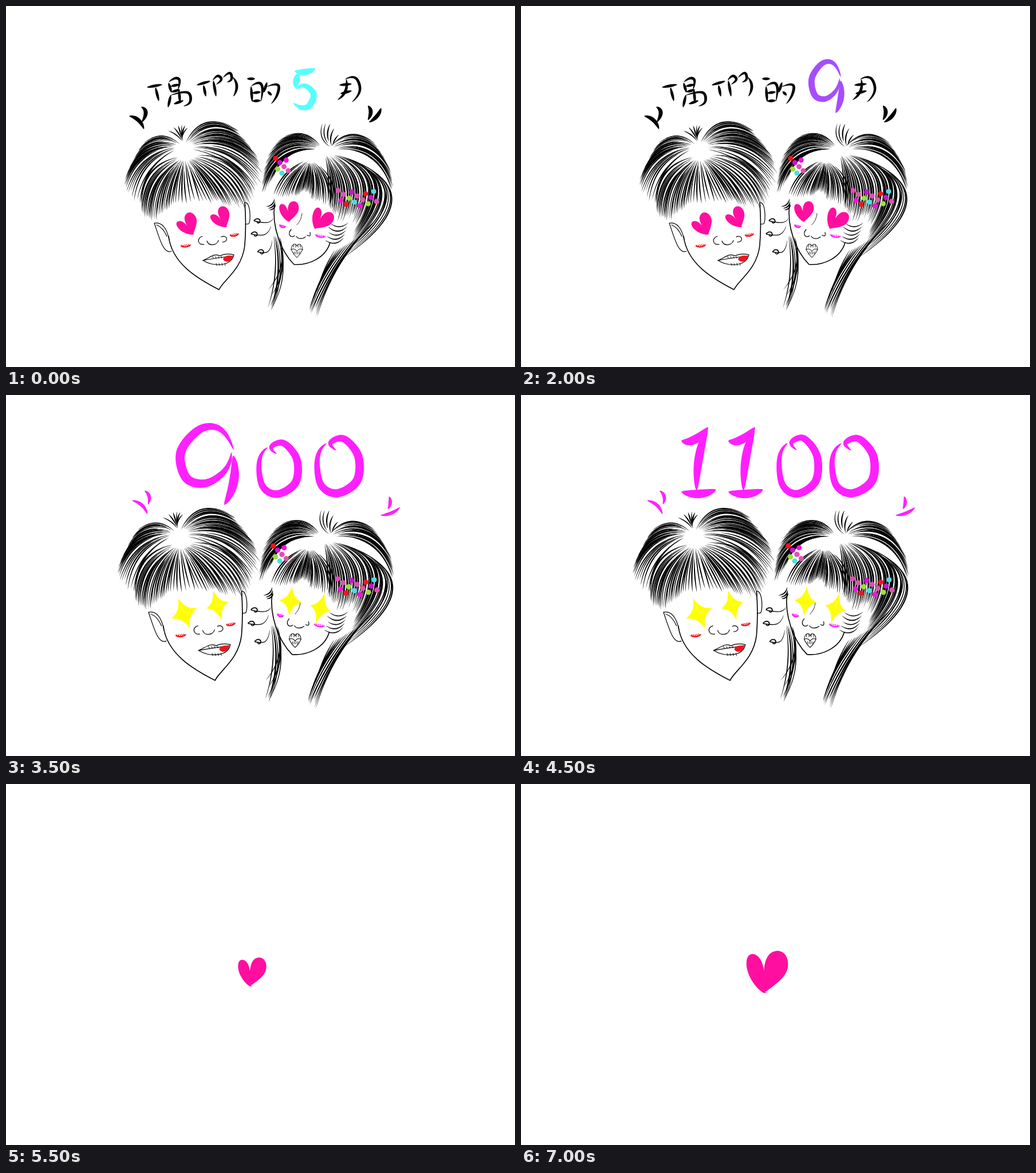
Write an HTML page with a canvas that moves like this. It is 889x630 px and loops after 7500 ms.

```html
<!DOCTYPE html>
<html lang="zh-Hant">
<head>
<meta charset="utf-8">
<title>偶們的</title>
<style>
html, body { margin: 0; width: 100%; height: 100%; overflow: hidden; background: #fff; }
canvas { display: block; }
</style>
</head>
<body>
<canvas id="stage" width="889" height="630" role="img" aria-label="偶們的月"></canvas>
<script>
const g = document.getElementById('stage').getContext('2d');
const INK = '#000', PINK = '#ff0fa0', MAGENTA = '#ff20ff', RED = '#f0141e', YELLOW = '#ffff00';

let seed = 1;
const rand = () => (seed = seed * 16807 % 2147483647) / 2147483647;
const mix = (a, b, t) => a + (b - a) * t;
const points = s => s.split(' ').map(p => p.split(',').map(Number));

// Catmull-Rom through key points, ends continued as parabolas
function spline(pts, t) {
  const n = pts.length;
  if (n === 1) return pts[0];
  const at = (i, k) => {
    if (i >= 0 && i < n) return pts[i][k];
    const a = i < 0 ? 0 : n - 1, d = i < 0 ? 1 : -1;
    if (n === 2) return 2 * pts[a][k] - pts[a + d][k];
    return 3 * pts[a][k] - 3 * pts[a + d][k] + pts[a + 2 * d][k];
  };
  const i = Math.min(Math.floor(t * (n - 1)), n - 2), u = t * (n - 1) - i;
  return [0, 1].map(k => {
    const [a, b, c, d] = [at(i - 1, k), at(i, k), at(i + 1, k), at(i + 2, k)];
    return b + u / 2 * (c - a + u * (2 * a - 5 * b + 4 * c - d + u * (3 * (b - c) + d - a)));
  });
}

// Stroke that swells to the given width and ends in points
function brush(pts, width, power = 0.6) {
  const steps = 8 * pts.length, left = [], right = [];
  for (let i = 0; i <= steps; i++) {
    const t = i / steps;
    const [x, y] = spline(pts, t);
    const [ax, ay] = spline(pts, Math.max(0, t - 0.01));
    const [bx, by] = spline(pts, Math.min(1, t + 0.01));
    const r = (width * Math.sin(Math.PI * t) ** power / 2 || 0) / (Math.hypot(bx - ax, by - ay) || 1);
    left.push([x + (ay - by) * r, y + (bx - ax) * r]);
    right.unshift([x - (ay - by) * r, y - (bx - ax) * r]);
  }
  g.beginPath();
  left.concat(right).forEach(p => g.lineTo(...p));
  g.fill();
}

function write(text, width, color) {
  g.fillStyle = color;
  text.split('|').forEach(s => brush(points(s), width));
}

// Hair: strands from a root curve to a tip curve, bent by a share of their length
function hair(roots, tips, n, bendA, bendB, width = 1.9) {
  roots = points(roots);
  tips = points(tips);
  g.fillStyle = INK;
  for (let i = 0; i < n; i++) {
    const t = i / (n - 1);
    const [x0, y0] = spline(roots, t), [x1, y1] = spline(tips, t);
    const bend = mix(bendA, bendB, t) + (rand() - 0.5) * 0.03;
    const dx = x1 - x0, dy = y1 - y0;
    const along = s => {
      const b = 4 * s * (1 - s) * bend;
      return [x0 + dx * s - dy * b, y0 + dy * s + dx * b];
    };
    const start = roots.length > 1 ? 0 : 0.07 + i % 3 * 0.1 + rand() * 0.05;
    const end = 0.95 + rand() * 0.09;
    brush([along(start), along((start + end) / 2), along(end)], width * (0.75 + rand() * 0.5), 0.7);
  }
}

function line(d, width = 1.2, color = INK) {
  g.strokeStyle = color;
  g.lineWidth = width;
  g.lineCap = 'round';
  g.stroke(new Path2D(d));
}

function fill(d, color) {
  g.fillStyle = color;
  g.fill(new Path2D(d));
}

function placed(x, y, turn, paint) {
  g.save();
  g.translate(x, y);
  g.rotate(turn);
  paint();
  g.restore();
}

function lashes(x, y, w, turn, color) {
  placed(x, y, turn, () => {
    line(`M${-w} -1 Q0 4 ${w} -1`, 2.2, color);
    for (let i = -2; i <= 2; i++) line(`M${i * w / 2.6} 1 l-1.5 -3.5`, 1.3, color);
  });
}

// Lock that starts as a small spiral and runs out to a point
function curl(x, y, endX, endY) {
  const pts = [];
  for (let i = 0; i < 8; i++) {
    const a = i * 0.9 + 3, r = 1.5 + i * 0.6;
    pts.push([x + r * Math.cos(-a), y + r * Math.sin(-a)]);
  }
  g.fillStyle = INK;
  brush([...pts, [mix(x, endX, 0.6), mix(y, endY, 0.2) + 3], [endX, endY]], 1.8, 0.4);
}

const BEADS = ['#e04fb4', '#f014dc', '#d75aa8', RED, '#9be03c', '#c814d2', '#50dce6'];

function beads(x, y, w, h, n, shift) {
  for (let i = 0; i < n; i++) {
    g.fillStyle = BEADS[(i + shift) % BEADS.length];
    g.beginPath();
    g.arc(x + w * i / (n - 1), y + h * (i * 0.62 % 1), 4.5, 0, 7);
    g.fill();
  }
}

function boy() {
  line('M289 428 C275 434 268 405 259 379 C272 376 281 388 285 408 M263 382 Q274 386 281 402');
  line('M284 402 C290 450 335 476 372 495 C380 478 412 460 417 418 Q420 380 417 344', 1.6);
  line('M417 343 C427 342 428 374 424 380 L418 381');
  line('M343 402 C333 404 334 418 346 416 M351 410 C354 420 369 418 371 409 M376 403 C386 398 390 412 378 412');
  line('M344 444 C358 438 364 431 374 436 Q384 431 398 434 C394 454 364 456 344 444 Q366 440 396 436');
  for (let i = 0; i < 4; i++) line(`M${367 + i * 5} 449 l1 4 M${361 + i * 5} 437 l1 3`, 0.9);
  fill('M379 442 C382 434 393 435 396 437 C395 446 384 450 379 442Z', RED);
  lashes(314, 419, 8, -0.1, RED);
  lashes(399, 400, 7, -0.2, RED);

  hair('308,246', '238,241 216,282 208,314 234,342', 25, 0.25, 0.15);
  hair('310,248', '402,214 425,245 446,282 432,326', 34, -0.28, -0.14);
  hair('313,262', '236,348 249,372 272,362 297,344 357,342 388,346 417,350 432,326', 62, 0.22, -0.2);
  hair('309,238', '284,218 304,207 318,212', 6, 0.1, -0.15);
}

function girl() {
  line('M469 346 C464 385 480 428 503 451 C528 453 558 440 566 413', 1.6);
  line('M517 362 Q516 374 508 382', 0.8);
  line('M498 390 C491 398 497 406 504 401 M507 402 C510 407 518 407 523 403 M526 400 Q533 404 531 395');
  line('M498 425 C499 413 507 414 508 419 C510 414 517 414 518 425 Q514 434 508 439 Q502 434 498 425 Q504 422 508 428 Q512 422 518 425', 1);
  for (let i = 0; i < 4; i++) line(`M${502 + i * 4} 416 l0 5 M${503 + i * 3} 433 l1 -4`, 0.9);
  lashes(483, 385, 5, 0.2, MAGENTA);
  lashes(549, 402, 8, 0.15, MAGENTA);

  curl(440, 376, 467, 370);
  curl(435, 399, 463, 383);
  curl(446, 430, 465, 408);
  hair('469,336 471,346', '455,350 459,356', 3, -0.2, -0.2);
  hair('598,378 590,404', '565,378 558,409', 5, -0.22, -0.22);

  hair('553,251', '482,230 460,258 451,290 449,320 466,302', 32, 0.22, 0.22);
  hair('531,268', '468,328 500,332 522,324 540,339 575,350', 38, 0.12, -0.16);
  hair('556,254', '562,345 582,372 602,370 612,390 604,410 588,440', 50, -0.05, -0.54);
  hair('562,252', '646,241 671,288 674,325', 19, -0.25, -0.22);
  hair('570,248', '553,204 566,206 582,224', 5, -0.2, -0.1);
  hair('655,365 610,405 575,425', '544,540 536,535 529,533 543,500', 13, 0.06, 0.04);
  hair('467,400 478,402', '457,528 464,530 459,494', 8, -0.06, -0.14);

  beads(471, 266, 22, 30, 7, 3);
  beads(580, 322, 67, 28, 15, 0);
}

function couple() {
  seed = 77;
  boy();
  girl();
}

function heart(x, y, size, turn = 0) {
  placed(x, y, turn, () => {
    g.scale(size, size);
    fill('M-6 37 C-25 25 -41 -4 -35 -24 C-31 -36 -14 -34 -8 -13 Q-5 -4 -6 7 C-6 -18 0 -36 18 -37 C37 -36 40 -12 33 1 C26 15 7 27 -6 37 L-1 35 L-2 37Z', PINK);
  });
}

function star(x, y, rx, ry, turn) {
  placed(x, y, turn, () => {
    const d = `M0 ${-ry} Q${rx * 0.25} ${-ry * 0.25} ${rx} 0 Q${rx * 0.25} ${ry * 0.25} 0 ${ry} Q${-rx * 0.25} ${ry * 0.25} ${-rx} 0 Q${-rx * 0.25} ${-ry * 0.25} 0 ${-ry}Z`;
    fill(d, YELLOW);
    line(d, 3, YELLOW);
    line(`M0 ${-ry * 0.6} L0 0 L${rx * 0.6} 0`, 0.6, '#ffffa0');
  });
}

// Key points of each digit in a box of 100 by 100
const DIGITS = {
  0: '27,13 8,38 15,80 48,94 88,74 91,34 62,6 35,12 47,25',
  1: '0,19 36,18 76,0|74,2 50,42 43,90|0,91 50,94 98,88',
  2: '8,22 45,4 88,24 55,65 15,92|8,94 50,94 100,84',
  5: '10,9 55,11 98,3|28,14 17,32 16,50|16,54 54,44 91,64 72,92 40,96 4,85',
  6: '85,4 30,30 12,70 45,94 85,80 75,52 40,52 18,72',
  7: '4,10 50,12 96,4|94,6 62,45 50,98',
  8: '70,10 30,8 25,38 75,60 70,90 25,90 25,62 70,38 70,10',
  9: '96,32 72,5 38,6 7,34 16,66 48,73 80,58 92,34|95,38 96,70 80,100'
};

function digit(ch, x, y, w, h, thick, color) {
  g.fillStyle = color;
  for (const s of DIGITS[ch].split('|'))
    brush(points(s).map(([a, b]) => [x + a * w / 100, y + b * h / 100]), thick);
}

const LETTERS = [
  '246,142 273,137|261,142 267,166|284,134 289,151|284,133 296,126 303,130 300,147|288,140 303,137|289,150 304,146|288,155 283,177|287,156 317,151 322,166 310,175|302,146 304,169|293,171 310,165',
  '333,138 357,131|345,138 349,158|362,130 367,158|361,130 370,122 376,128 367,137|379,125 391,117 394,127 386,133|396,124 403,140 397,158',
  '421,127 435,127|428,140 430,167|428,140 446,137 445,167|430,152 445,150|430,166 445,165|456,133 450,151|455,141 475,138 474,154 463,171|457,149 464,156',
  '594,127 593,148 579,164|592,128 611,126 618,147 604,168|582,138 604,136|584,153 604,148'
];

const MONTH_COLORS = ['#55ffff', '#ff5a8c', '#ffa53c', '#508cff', '#a64dff', '#ff50c8', '#50ff78'];

function monthScene(i) {
  couple();
  heart(319, 382, 0.5, -0.6);
  heart(377, 370, 0.47, -0.6);
  heart(495, 359, 0.47, -0.1);
  heart(551, 373, 0.52, 0.5);
  LETTERS.forEach(s => write(s, 4.8, INK));
  write('215,192 231,199 241,215|236,176 244,186 237,203|632,174 637,185 632,199|655,178 648,192 634,203', 7, INK);

  const month = 5 + i, color = MONTH_COLORS[i];
  if (month === 5) digit(5, 500, 107, 41, 73, 11, color);
  else if (month < 10) digit(month, 504, 95, 57, 92, 11, color);
  else [...String(month)].forEach((ch, k) => digit(ch, 492 + 46 * k, 109 + 3 * k, 31, 77, 11, color));
}

function sumScene(i) {
  g.save();
  g.transform(1.028, 0, 0, 1.0245, -17.3, -9.1);
  couple();
  g.restore();
  star(311, 381, 20, 23, -0.38);
  star(369, 367, 16, 21, -0.28);
  star(497, 360, 16, 20, 0.1);
  star(549, 372, 15, 21, 0.28);
  write('220,184 237,192 247,208|242,167 250,177 248,191|669,177 671,188 667,199|688,196 673,206 654,210', 6, MAGENTA);

  if (i === 0) digit(9, 298, 52, 104, 140, 16, MAGENTA);
  else {
    digit(1, 280, 56, 62, 124, 15, MAGENTA);
    digit(i - 1, 362, 56, 62, 124, 15, MAGENTA);
  }
  if (i === 0) digit(0, 436, 78, 79, 101, 14, MAGENTA);
  else digit(0, 445, 69, 79, 110, 14, MAGENTA);
  digit(0, 537, 70, 86, 108, 15, MAGENTA);
}

const BEAT = 500, STEPS = 15;
let shown = -1;

function draw(step) {
  g.fillStyle = '#fff';
  g.fillRect(0, 0, 889, 630);
  if (step < 7) monthScene(step);
  else if (step < 11) sumScene(step - 7);
  else heart(430, 328, step % 2 ? 0.68 : 1);
}

function tick() {
  const step = Math.floor(performance.now() / BEAT) % STEPS;
  if (step !== shown) draw(shown = step);
  requestAnimationFrame(tick);
}
tick();
</script>
</body>
</html>
```
